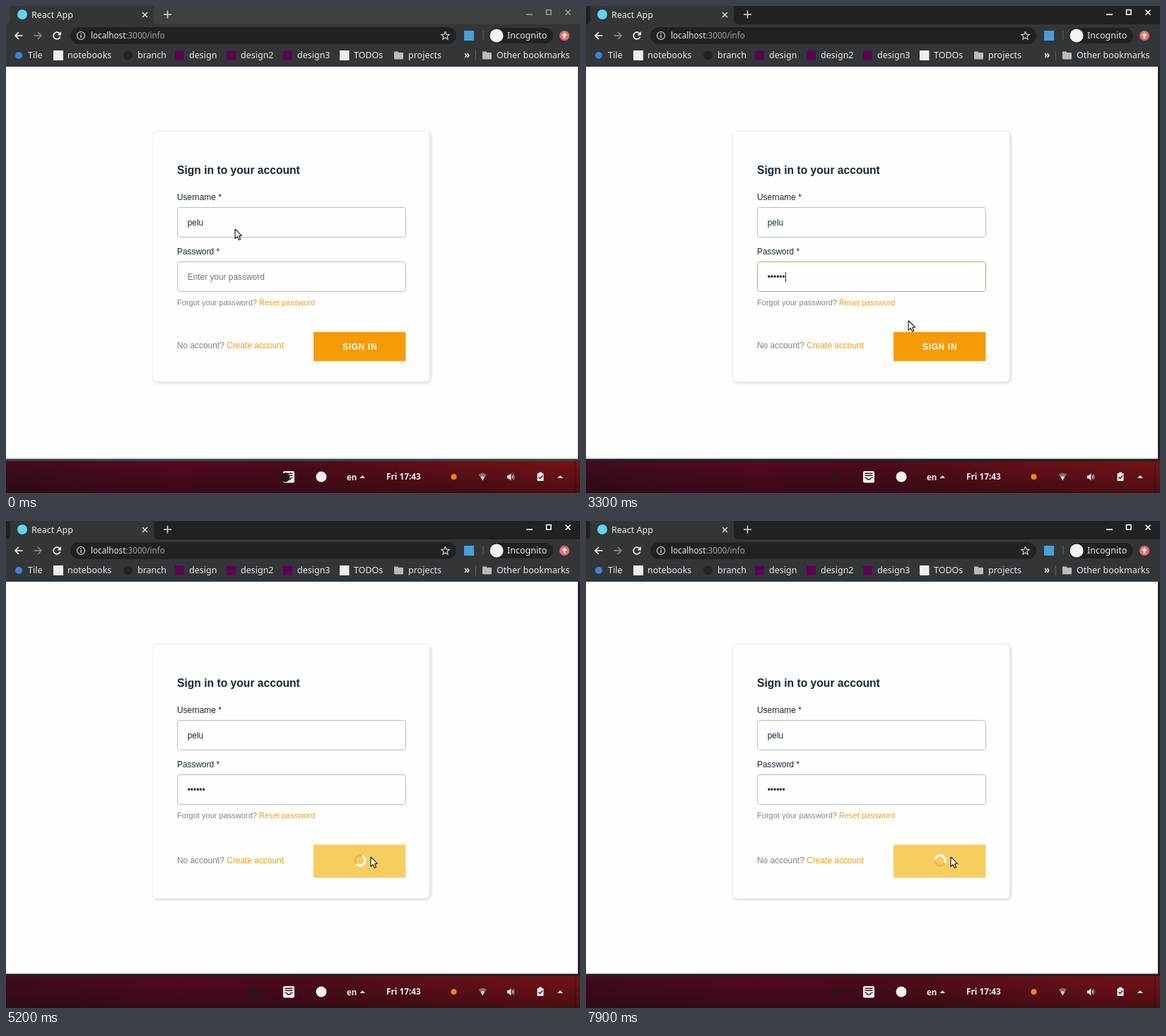
Animation of 812x690 px, one loop 8000 ms. Source, as an HTML page with a canvas:

```html
<!DOCTYPE html>
<html lang="en">
<head>
<meta charset="utf-8">
<title>Sign in</title>
<style>
html, body { margin: 0; width: 100%; height: 100%; overflow: hidden; background: #202124; }
canvas { display: block; }
</style>
</head>
<body>
<canvas id="stage" width="812" height="690"></canvas>
<script>
const ctx = document.getElementById('stage').getContext('2d');
const LOOP = 8000, STEP = 100;
const UI = '"Noto Sans", sans-serif';
const FORM = '"Liberation Sans", Arial, sans-serif';

function rect(x, y, w, h, color) {
  ctx.fillStyle = color;
  ctx.fillRect(x, y, w, h);
}

function rounded(x, y, w, h, r, fill, stroke) {
  ctx.beginPath();
  ctx.roundRect(x, y, w, h, r);
  if (fill) { ctx.fillStyle = fill; ctx.fill(); }
  if (stroke) { ctx.strokeStyle = stroke; ctx.lineWidth = 1; ctx.stroke(); }
}

function disc(x, y, r, color) {
  ctx.beginPath();
  ctx.arc(x, y, r, 0, 7);
  ctx.fillStyle = color;
  ctx.fill();
}

function line(color, width, ...pts) {
  trace(pts);
  ctx.strokeStyle = color;
  ctx.lineWidth = width;
  ctx.stroke();
}

function poly(color, ...pts) {
  trace(pts);
  ctx.closePath();
  ctx.fillStyle = color;
  ctx.fill();
}

function trace(pts) {
  ctx.beginPath();
  for (let i = 0; i < pts.length; i += 2) ctx.lineTo(pts[i], pts[i + 1]);
}

function text(str, x, y, size, color, family = FORM, weight = 400) {
  ctx.font = `${weight} ${size}px ${family}`;
  ctx.fillStyle = color;
  ctx.fillText(str, x, y);
}

function ui(str, x, y, size = 12.5, color = '#e8eaed', weight = 400) {
  text(str, x, y, size, color, UI, weight);
}

const clamp = v => Math.max(0, Math.min(1, v));
const lerp = (a, b, u) => a + (b - a) * u;
const ease = u => u * u * (3 - 2 * u);
const mix = (a, b, u) => `rgb(${a.map((v, i) => Math.round(lerp(v, b[i], u)))})`;

function folder(x) {
  rounded(x, 66, 13, 9.5, 1, '#b9bcb8');
  rect(x, 64.5, 6, 3, '#b9bcb8');
}

function titleBar(active) {
  const frame = mix([60, 64, 67], [32, 33, 36], active);
  rect(0, 0, 812, 645, frame);
  ctx.beginPath();
  ctx.moveTo(0, 26);
  ctx.quadraticCurveTo(6, 26, 6, 19);
  ctx.lineTo(6, 0);
  ctx.lineTo(209, 0);
  ctx.lineTo(209, 19);
  ctx.quadraticCurveTo(209, 26, 216, 26);
  ctx.fillStyle = '#323639';
  ctx.fill();

  disc(23, 12, 7, '#5fd5ee');
  ui('React App', 36, 16.5);
  line('#e0e2e4', 1.4, 193, 9, 200, 16);
  line('#e0e2e4', 1.4, 200, 9, 193, 16);
  line('#d0d2d4', 1.6, 223, 12, 234, 12);
  line('#d0d2d4', 1.6, 228.5, 6.5, 228.5, 17.5);

  const mark = mix([150, 153, 156], [245, 245, 245], active);
  line(mark, 1.7, 736, 12, 745, 12);
  ctx.lineWidth = 1.6;
  ctx.strokeStyle = mark;
  ctx.strokeRect(764.5, 5.5, 6.5, 6.5);
  line(mark, 1.7, 791.5, 5.5, 798.5, 12.5);
  line(mark, 1.7, 798.5, 5.5, 791.5, 12.5);
}

function arrow(x, dir, color) {
  line(color, 1.7, x - 5.5 * dir, 42, x + 5 * dir, 42);
  line(color, 1.7, x, 37, x + 5 * dir, 42, x, 47);
}

function toolbar() {
  rect(0, 26, 812, 60, '#323639');
  arrow(18, -1, '#eceef0');
  arrow(45, 1, '#85888b');

  ctx.beginPath();
  ctx.arc(72, 42, 4.8, 0.3, 5.5);
  ctx.strokeStyle = '#eceef0';
  ctx.lineWidth = 1.8;
  ctx.stroke();
  poly('#eceef0', 78, 36, 78, 41.5, 72.5, 41.5);

  rounded(91, 30, 546, 24, 12, '#202124');
  ctx.beginPath();
  ctx.arc(106, 42, 5.5, 0, 7);
  ctx.strokeStyle = '#d5d7da';
  ctx.lineWidth = 1.2;
  ctx.stroke();
  rect(105.3, 41, 1.5, 4, '#d5d7da');
  rect(105.3, 38.5, 1.5, 1.5, '#d5d7da');
  ui('localhost', 120, 46, 11.7);
  const hostWidth = ctx.measureText('localhost').width;
  ui(':3000/info', 120 + hostWidth, 46, 11.7, '#a0a4a8');

  const star = [];
  for (let i = 0; i < 11; i++) {
    const a = -Math.PI / 2 + i * Math.PI / 5, r = i % 2 ? 2.7 : 6;
    star.push(621.5 + r * Math.cos(a), 42.3 + r * Math.sin(a));
  }
  line('#d0d3d6', 1.2, ...star);

  rect(648, 35, 14, 14, '#4a9fd8');
  rect(674.5, 35, 1, 13, '#5f6468');
  rounded(683, 31, 91, 22, 11, '#202124');
  disc(694, 42, 9.5, '#f1f3f4');
  ui('Incognito', 709, 46.3);
  disc(790, 42, 7, '#ee6b67');
  poly('#fff', 790, 37.8, 794, 42, 791.3, 42, 791.3, 46, 788.7, 46, 788.7, 42, 786, 42);

  disc(18, 70, 5, '#3a83d8');
  ui('Tile', 31, 74.3);
  rect(67, 63, 14, 14, '#eceeed');
  ui('notebooks', 87, 74.3);
  disc(172.5, 70, 6.5, '#202427');
  ui('branch', 186, 74.3);
  [['design', 239], ['design2', 312], ['design3', 392]].forEach(([name, x]) => {
    rect(x, 63.5, 13, 13, '#5d0056');
    ui(name, x + 20, 74.3);
  });
  rect(472, 63, 13.5, 14, '#eceeed');
  ui('TODOs', 492, 74.3);
  folder(549);
  ui('projects', 569, 74.3);
  ui('»', 648, 74, 13.5, '#eceef0', 600);
  rect(664, 63, 1, 14, '#62666a');
  folder(674);
  ui('Other bookmarks', 694, 74.3);
}

function taskbar(t) {
  const base = ctx.createLinearGradient(0, 0, 812, 0);
  [[0, '#400b22'], [.3, '#560922'], [.5, '#4d0b1b'], [.75, '#640e19'], [1, '#781216']]
    .forEach(([p, c]) => base.addColorStop(p, c));
  rect(0, 645, 812, 45, base);
  const shade = ctx.createLinearGradient(0, 645, 0, 690);
  shade.addColorStop(0, 'rgba(20,10,12,0)');
  shade.addColorStop(1, 'rgba(20,10,12,.45)');
  rect(0, 645, 812, 45, shade);
  rect(804.5, 645, 1, 45, 'rgba(20,10,12,.5)');

  rounded(392, 659, 16, 16.5, 2, '#f2f0f0');
  rect(394.5, 661.5, 11, 1.5, '#4a1320');
  rect(394.5, 664.5, 11, 1.5, '#4a1320');
  poly('#4a1320', 394, 668, 397.5, 668, 398.5, 670, 401.5, 670, 402.5, 668, 406, 668, 406, 669,
    403.5, 669, 402.5, 671.5, 397.5, 671.5, 396.5, 669, 394, 669);
  disc(lerp(395, 353, ease(clamp(t / 400))), 668, 6.5, '#2c1519');

  disc(446, 667, 7.5, '#f2f0f0');
  ui('en', 482, 671.5, 11.5, '#eeecec', 600);
  poly('#e4dfe0', 500.5, 669, 504.3, 665, 508, 669);
  ui('Fri 17:43', 538, 671.3, 11.8, '#f2f0f0', 700);
  disc(633.5, 667, 4, '#f18412');

  poly('#8d6a6c', 668.5, 663.5, 674.3, 661.5, 680, 663.5, 674.3, 672.5);
  poly('#ddd6d6', 671.5, 667, 674.3, 666, 677, 667, 674.3, 672.5);
  poly('#e8e4e4', 709, 665, 711.3, 665, 714.5, 662, 714.5, 672.5, 711.3, 669.5, 709, 669.5);
  [2.5, 4.7].forEach((r, i) => {
    ctx.beginPath();
    ctx.arc(714.5, 667.2, r, -1, 1);
    ctx.strokeStyle = i ? '#a98b8d' : '#e8e4e4';
    ctx.lineWidth = 1.3;
    ctx.stroke();
  });
  rounded(751.5, 662, 9, 11, 1, '#eeeaea');
  rect(754, 660.5, 4, 2.5, '#eeeaea');
  line('#551019', 1.5, 753.5, 667.5, 755.5, 669.5, 759, 665.5);
  poly('#e4dfe0', 780, 669, 784, 665, 788, 669);
}

function spinner(t) {
  const mid = (t / 1000 * 360 - 38) * Math.PI / 180;
  ctx.lineWidth = 3.2;
  ctx.beginPath();
  ctx.arc(501, 481, 7.2, 0, 7);
  ctx.strokeStyle = 'rgba(226,165,72,.55)';
  ctx.stroke();
  ctx.beginPath();
  ctx.arc(501, 481, 7.2, mid - 1.75, mid + 1.75);
  ctx.strokeStyle = '#fffdf6';
  ctx.stroke();
}

function form(t, hover) {
  const busy = t >= 4200, focused = t >= 600 && t < 3500;
  const up = busy ? -3 : 0;
  const ink = '#152939', soft = '#828282', link = t < 3500 ? '#f29b13' : '#e5a117';

  ctx.save();
  ctx.shadowColor = 'rgba(0,0,0,.22)';
  ctx.shadowBlur = 4;
  ctx.shadowOffsetX = ctx.shadowOffsetY = 1;
  rounded(208, 178 + up, 391.5, busy ? 360 : 354.5, 6, '#fefefe');
  ctx.restore();

  text('Sign in to your account', 242, 238 + up, 15.65, ink, FORM, 700);
  text('Username *', 242, 275 + up, 11.9, ink);
  rounded(242.5, 285.5 + up, 323, 42, 3, '#fefefe', '#bcbcbc');
  text('pelu', 256.7, 310.5 + up, 11.9, ink);
  text('Password *', 242, 352 + up, 11.9, ink);
  rounded(242.5, 362.5 + up, 323, 42, 3, '#fefefe', focused ? '#d6a240' : '#bcbcbc');

  const typed = [1300, 1700, 1900, 2200, 2300, 2600].filter(k => t >= k).length;
  if (typed) text('•'.repeat(typed), 256.7, 388 + up, 11.9, ink);
  else text('Enter your password', 256.7, 388, 11.9, '#757575');
  if (focused) rect(257 + Math.round(typed * 4.15), 377, 1, 14, ink);

  text('Forgot your password?', 242, 424 + up, 11.05, soft);
  text('Reset password', 358, 424 + up, 11.05, link);
  text('No account?', 242, 485, 11.9, soft);
  text('Create account', 312.3, 485, 11.9, link);

  if (busy) {
    rect(435, 458.5, 130.5, 47, '#f7cd5f');
    spinner(t);
  } else {
    rect(435, 462, 130.5, 41, hover ? '#e5a333' : '#f59b07');
    ctx.letterSpacing = '0.7px';
    text('SIGN IN', 476, 486.5, 11.9, '#fffdf8', FORM, 700);
    ctx.letterSpacing = '0px';
  }
}

function pointer(t) {
  const a = ease(clamp(t / 400)), b = ease(clamp((t - 3000) / 500));
  return {
    x: lerp(lerp(324, 346, a), 516, b),
    y: lerp(lerp(316, 390, a), 476, b)
  };
}

function drawPointer({ x, y }, t, hover) {
  ctx.save();
  ctx.translate(x, y);
  ctx.lineJoin = 'round';
  if (hover && t < 4200) {
    ctx.beginPath();
    ctx.moveTo(-.5, 0);
    ctx.quadraticCurveTo(1, -2, 2.5, 0);
    ctx.lineTo(2.5, 4);
    ctx.lineTo(8, 5.5);
    ctx.quadraticCurveTo(9.5, 6, 9, 9);
    ctx.lineTo(8, 13);
    ctx.lineTo(1, 13);
    ctx.lineTo(-3.5, 8);
    ctx.quadraticCurveTo(-3.5, 5.5, -.5, 7.5);
    ctx.closePath();
    ctx.fillStyle = '#fff';
    ctx.strokeStyle = '#151515';
    ctx.lineWidth = 1.4;
    ctx.fill();
    ctx.stroke();
    line('#333', .9, 3, 5, 3, 8);
    line('#333', .9, 5.8, 5.5, 5.8, 8.5);
  } else if (t < 4200 && y > 362 && y < 405 && x < 566) {
    [['#fff', 3.4], ['#111', 1.5]].forEach(([color, w]) => {
      line(color, w, -3.5, -6.5, -1, -6.5, 0, -5.5, 0, 5.5, -1, 6.5, -3.5, 6.5);
      line(color, w, 3.5, -6.5, 1, -6.5, 0, -5.5, 0, 5.5, 1, 6.5, 3.5, 6.5);
    });
  } else {
    const shape = [0, 0, 0, 13.5, 3.2, 10.8, 5.4, 15.5, 7.6, 14.5, 5.5, 9.8, 9.4, 9.4, 0, 0];
    poly('#fff', ...shape);
    line('#222', 1.2, ...shape);
  }
  ctx.restore();
}

function draw(time) {
  const t = Math.floor(time % LOOP / STEP) * STEP;
  const active = t < 600 ? 0 : t < 700 ? .5 : 1;
  const p = pointer(t);
  const hover = p.x > 435 && p.y > 462;
  titleBar(active);
  toolbar();
  rect(0, 86, 809, 555.5, '#fefefd');
  taskbar(t);
  form(t, hover);
  drawPointer(p, t, hover);
}

const start = performance.now();
function tick() {
  draw(performance.now() - start);
  requestAnimationFrame(tick);
}
tick();
</script>
</body>
</html>
```
